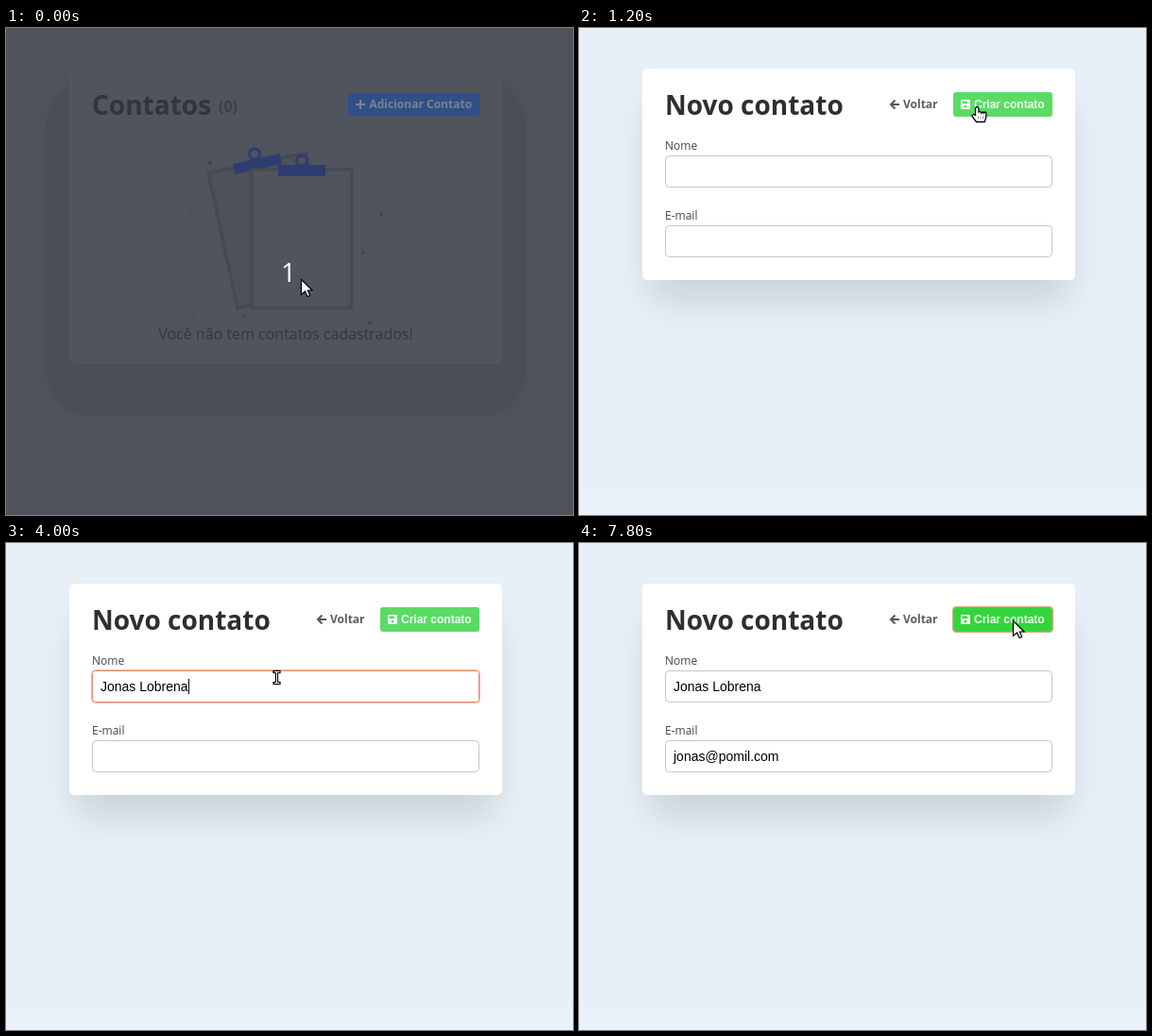
Animation, 600 px wide and 516 px high, one loop 8 s. Source, as an HTML page with a canvas:

```html
<!DOCTYPE html>
<html lang="pt-BR">
<head>
<meta charset="utf-8">
<title>Contatos</title>
<style>
html, body { margin: 0; width: 600px; height: 516px; overflow: hidden; }
canvas { display: block; }
</style>
</head>
<body>
<canvas id="stage" width="600" height="516"></canvas>
<script>
const ctx = document.getElementById('stage').getContext('2d');
const LOOP = 8000;
const SANS = '"Open Sans", "Noto Sans", sans-serif';
const ARIAL = '"Liberation Sans", Arial, sans-serif';

const LIGHT = {
  card: '#fff', title: '#2e2e33', count: '#888', note: '#555', button: '#73b0ff', label: '#fff',
  clip: '#625df9', line: '#dadada', sheet: '#f9f9f9', front: '#fff',
  teal: '#92e2cc', blue: '#8cbff0', red: '#f2a595', yellow: '#fbd993'
};
const DIM = {
  card: '#50545c', title: '#32353d', count: '#3c4048', note: '#343840', button: '#304f86', label: '#7c828c',
  clip: '#2d3d70', line: '#464a52', sheet: '#4d5159', front: '#50545c',
  teal: '#3f5653', blue: '#3a4658', red: '#54423f', yellow: '#5a5347'
};

// Typed text: [time, number of visible characters]
const NAME = { text: 'Jonas Lobrena', y: 135, focus: 1900, blur: 4500, keys: [
  [2700, 1], [2900, 2], [3000, 3], [3100, 4], [3200, 6], [3400, 7], [3500, 9],
  [3600, 10], [3700, 11], [3900, 12], [4000, 13]] };
const EMAIL = { text: 'jonas@pomil.com', y: 209, focus: 4500, blur: 7800, keys: [
  [4600, 3], [4700, 5], [4900, 6], [5100, 7], [5800, 8], [6000, 10], [6200, 11],
  [6400, 12], [6600, 14], [6700, 15]] };

function text(str, x, y, font, color, align = 'left') {
  ctx.font = font;
  ctx.fillStyle = color;
  ctx.textAlign = align;
  ctx.fillText(str, x, y);
}

function box(x, y, w, h, r, color) {
  ctx.fillStyle = color;
  ctx.beginPath();
  ctx.roundRect(x, y, w, h, r);
  ctx.fill();
}

function frame(x, y, w, h, r, color) {
  ctx.strokeStyle = color;
  ctx.lineWidth = 1;
  ctx.beginPath();
  ctx.roundRect(x + 0.5, y + 0.5, w - 1, h - 1, r);
  ctx.stroke();
}

function trace(points, close) {
  ctx.beginPath();
  points.forEach(([x, y]) => ctx.lineTo(x, y));
  if (close) ctx.closePath();
}

function line(points, color, width) {
  trace(points);
  ctx.strokeStyle = color;
  ctx.lineWidth = width;
  ctx.stroke();
}

function page() {
  ctx.fillStyle = '#e7eff7';
  ctx.fillRect(0, 0, 600, 516);
  ctx.fillStyle = '#e9f1f9';
  ctx.fillRect(0, 491, 600, 25);
}

function dimPage() {
  ctx.fillStyle = '#4e535b';
  ctx.fillRect(0, 0, 600, 516);
  box(43, 55, 507, 356, 46, '#4a4f57');
}

function card(h, color, shadow) {
  if (shadow) {
    ctx.save();
    ctx.shadowColor = 'rgba(0, 0, 0, 0.13)';
    ctx.shadowBlur = 40;
    ctx.shadowOffsetY = 30;
    box(75, 51, 442, h - 16, 4, '#fff');
    ctx.restore();
  }
  box(67, 43, 458, h, 5, color);
}

function ring(x, y, color) {
  ctx.strokeStyle = color;
  ctx.lineWidth = 3;
  ctx.beginPath();
  ctx.arc(x, y, 5.5, 0, 7);
  ctx.stroke();
}

function clipboards(c) {
  ctx.lineWidth = 3.5;
  ctx.strokeStyle = c.line;
  ctx.fillStyle = c.sheet;
  trace([[214, 154], [318, 132], [349, 275], [245, 297]], true);
  ctx.fill();
  ctx.stroke();
  ring(263, 133.5, c.clip);
  ctx.fillStyle = c.clip;
  trace([[240, 144], [289.5, 133], [292, 144], [242.5, 155]], true);
  ctx.fill();
  ctx.fillStyle = c.front;
  ctx.strokeStyle = c.line;
  ctx.lineWidth = 3.5;
  ctx.beginPath();
  ctx.rect(260, 150, 106, 146.5);
  ctx.fill();
  ctx.stroke();
  ring(313, 140.5, c.clip);
  ctx.fillStyle = c.clip;
  ctx.fillRect(288, 145, 50, 12);
}

function confetti(c) {
  const dots = [[216, 143, 'blue'], [359, 136, 'yellow'], [196, 194, 'teal'], [397, 197.5, 'red'],
    [378, 238, 'red'], [227, 261, 'yellow'], [252, 305.5, 'red'], [385, 312, 'blue']];
  for (const [x, y, color] of dots) box(x - 2, y - 1.8, 3.8, 3.6, 1.5, c[color]);
  for (const [x, y] of [[307.5, 121.5], [198.5, 305.5]]) {
    line([[x - 3, y], [x + 3, y]], c.teal, 1);
    line([[x, y - 3], [x, y + 3]], c.teal, 1);
  }
}

function contactList(c, hover) {
  card(313, c.card, c === LIGHT);
  text('Contatos', 91, 92, `bold 28px ${SANS}`, c.title);
  text('(0)', 225, 89, `bold 16px ${SANS}`, c.count);
  box(362, 69, 139, 24, 3, hover ? '#4a99ff' : c.button);
  line([[370, 81], [380, 81]], c.label, 2);
  line([[375, 76], [375, 86]], c.label, 2);
  text('Adicionar Contato', 384.5, 85, `bold 12px ${SANS}`, c.label);
  confetti(c);
  clipboards(c);
  text('Você não tem contatos cadastrados!', 296, 330, `16px ${SANS}`, c.note, 'center');
}

function saveIcon(x, y, back) {
  box(x, y, 10, 10, 1.3, '#fff');
  ctx.fillStyle = back;
  ctx.fillRect(x + 1.5, y + 1.5, 5.5, 2.7);
  ctx.beginPath();
  ctx.arc(x + 5, y + 7, 1.5, 0, 7);
  ctx.fill();
}

function field(input, label, t) {
  const { y } = input;
  const focused = t >= input.focus && t < input.blur;
  text(label, 91, y - 6, `12px ${SANS}`, '#444');
  box(91, y, 410, 34, 4, '#fff');
  if (focused) {
    frame(90, y - 1, 412, 36, 4, '#efb7a4');
    frame(91, y, 410, 34, 3, '#e08e73');
  } else {
    frame(91, y, 410, 34, 4, '#c6c6c6');
  }

  let count = 0, last = input.focus;
  for (const [time, n] of input.keys) if (t >= time) [last, count] = [time, n];
  const typed = input.text.slice(0, count);
  text(typed, 100, y + 22, `14px ${ARIAL}`, '#000');
  const wait = t - last;
  if (focused && wait % 1100 < 500 + (count ? 0 : 100)) {
    ctx.fillStyle = '#000';
    ctx.fillRect(Math.round(100 + ctx.measureText(typed).width), y + 9, 1, 16);
  }
}

function contactForm(t) {
  const green = t >= 7600 ? '#32d53b' : '#5adc64';
  card(224, '#fff', true);
  text('Novo contato', 91, 92, `bold 28px ${SANS}`, LIGHT.title);
  line([[339, 81], [330.5, 81]], '#56575f', 2);
  line([[334.5, 76.5], [330, 81], [334.5, 85.5]], '#56575f', 2);
  text('Voltar', 343, 85, `bold 12px ${SANS}`, '#5b5c64');
  box(396, 68, 105, 26, 3, green);
  if (t >= 7800) {
    frame(395, 67, 107, 28, 3, '#c9ae72');
    frame(396, 68, 105, 26, 3, '#7fb84e');
  }
  saveIcon(404, 76, green);
  text('Criar contato', 418, 85, `bold 12px ${ARIAL}`, '#f4fff4');
  field(NAME, 'Nome', t);
  field(EMAIL, 'E-mail', t);
}

const pointers = {
  arrow() {
    trace([[0, 0], [0, 16], [4, 12.5], [6.5, 18], [9.2, 17], [6.8, 11.5], [11.5, 11.5]], true);
    ctx.fill();
    ctx.lineWidth = 1.2;
    ctx.stroke();
  },
  hand() {
    ctx.beginPath();
    ctx.moveTo(-2, 9);
    ctx.lineTo(-2, 1.5);
    ctx.quadraticCurveTo(0, -1.5, 1.5, 1.5);
    ctx.lineTo(1.5, 5.5);
    for (const x of [4.3, 7, 9.5]) ctx.quadraticCurveTo(x - 1, 4.2, x, 6.8);
    ctx.lineTo(9.2, 11);
    ctx.lineTo(7.8, 16);
    ctx.lineTo(-1, 16);
    ctx.lineTo(-5.5, 10);
    ctx.quadraticCurveTo(-5.5, 7, -2, 9);
    ctx.closePath();
    ctx.fill();
    ctx.lineWidth = 1.3;
    ctx.stroke();
    for (const x of [1, 3.5, 6]) line([[x, 10], [x, 13]], '#777', 0.8);
  },
  beam() {
    for (const [color, width] of [['#000', 3.2], ['#fff', 1]]) {
      ctx.lineCap = 'square';
      line([[-2.5, -6], [2.5, -6]], color, width);
      line([[-2.5, 6], [2.5, 6]], color, width);
      line([[0, -6], [0, 6]], color, width);
    }
  }
};

function pointer(kind, x, y) {
  ctx.save();
  ctx.translate(Math.round(x) + 0.5, Math.round(y) + 0.5);
  ctx.fillStyle = '#fff';
  ctx.strokeStyle = '#000';
  pointers[kind]();
  ctx.restore();
}

const mix = (a, b, s) => a + (b - a) * s;
const ease = s => s * s * (3 - 2 * s);
const progress = (t, from, to) => Math.min(1, Math.max(0, (t - from) / (to - from)));

function pointerAt(t) {
  if (t < 100) return ['arrow', 312, 266];
  if (t < 1400) {
    const s = ease(progress(t, 100, 700));
    return [s > 0.95 ? 'hand' : 'arrow', mix(317, 421, s), mix(254, 83, s)];
  }
  if (t < 7200) {
    if (t >= 2100) return ['beam', 286, 142];
    const s = ease(progress(t, 1300, 1900));
    const y = mix(83, 142, s);
    return [y > 135 ? 'beam' : 'arrow', mix(421, 291, s), y];
  }
  const s = ease(progress(t, 7100, 7600));
  const y = mix(142, 82, s) - 70 * s * s * (1 - s) * 2;
  return [y > 135 ? 'beam' : 'arrow', mix(286, 459, s), y];
}

function draw() {
  const t = Math.floor(performance.now() % LOOP / 100) * 100;
  if (t < 100) {
    dimPage();
    contactList(DIM, false);
    text('1', 299, 269, `28px ${SANS}`, '#fff', 'center');
  } else {
    page();
    if (t < 1200) contactList(LIGHT, t >= 700);
    else contactForm(t);
  }
  pointer(...pointerAt(t));
  requestAnimationFrame(draw);
}
draw();
</script>
</body>
</html>
```
